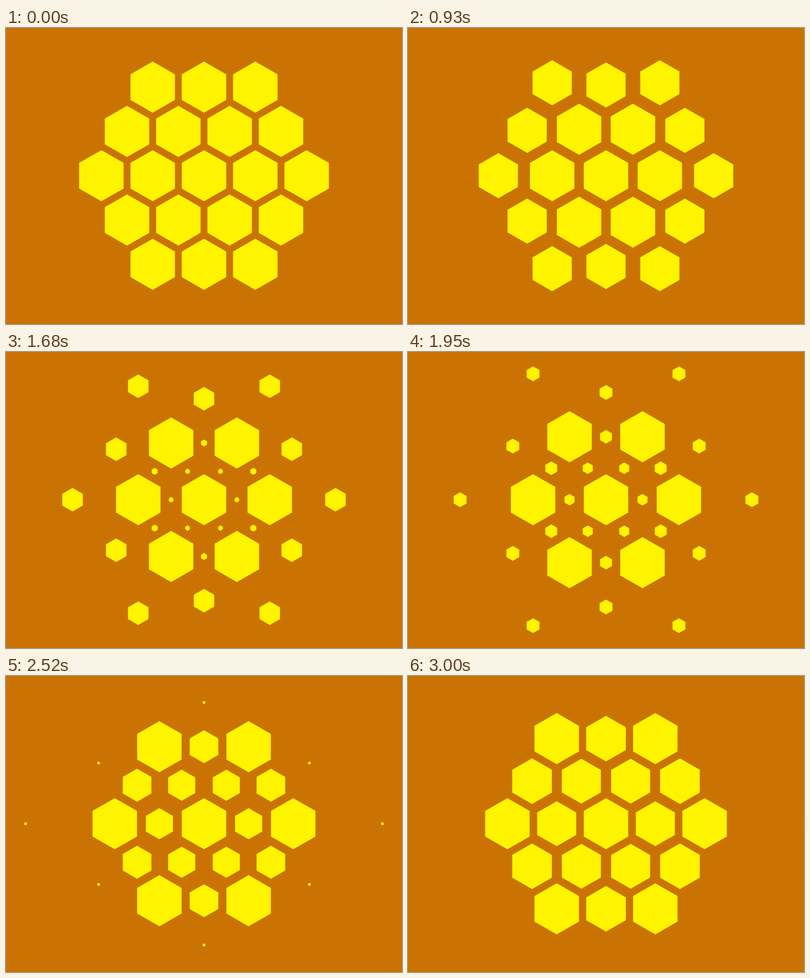
These frames come from a looping animation (700 px wide and 525 px high, 3.03 s). An HTML page with a canvas:

```html
<!DOCTYPE html>
<html lang="en">
<head>
<meta charset="utf-8">
<title>Honeycomb</title>
<style>
  html, body { margin: 0; width: 100%; height: 100%; overflow: hidden; background: #ca7302; }
  canvas { display: block; }
</style>
</head>
<body>
<canvas id="stage" width="700" height="525"></canvas>
<script>
const ctx = document.getElementById('stage').getContext('2d');
const LOOP = 3030;
const EASE_START = 175, EASE_TIME = 3525; // the loop cuts the ease short
const SHUTTER = 18, SAMPLES = 4;          // motion blur, ms and layers
const CENTER = { x: 350, y: 262 };
const RADIUS = 45.35;
const SPACING = 2 * RADIUS;

// Three rings of a hexagonal lattice.
const cells = [];
for (let i = -2; i <= 2; i++) {
  for (let j = -2; j <= 2; j++) {
    const ring = Math.max(Math.abs(i), Math.abs(j), Math.abs(i + j));
    if (ring > 2) continue;
    cells.push({
      x: SPACING * (i + j / 2),
      y: SPACING * j * Math.sqrt(3) / 2,
      ring,
      corner: i * j * (i + j) === 0
    });
  }
}

function ease(t) {
  const u = Math.min(1, Math.max(0, (t - EASE_START) / EASE_TIME));
  return u * u / (u * u + (1 - u) * (1 - u));
}

function hexagon(cell, zoom, size) {
  const x = CENTER.x + cell.x * zoom, y = CENTER.y + cell.y * zoom;
  ctx.beginPath();
  for (let k = 0; k < 6; k++) {
    const a = Math.PI * (k / 3 + 1 / 6);
    ctx.lineTo(x + RADIUS * size * Math.cos(a), y + RADIUS * size * Math.sin(a));
  }
  ctx.fill();
}

function drawCells(t) {
  const p = ease(t);
  const zoom = 2 ** p;
  const fade = (1 - p) ** 1.75;
  for (const cell of cells) {
    const edge = cell.ring === 2 && !cell.corner;
    hexagon(cell, edge ? (1 + zoom) / 2 : zoom, cell.ring === 2 ? fade : 1);

    // New cells grow halfway between the spreading ones.
    if (cell.ring === 1) hexagon(cell, zoom / 2, p ** 2.2);
    if (edge) hexagon(cell, zoom / 2, p ** 1.95);
  }
}

// Adding faint layers averages the moments while the shutter is open.
function draw(t) {
  ctx.clearRect(0, 0, 700, 525);
  ctx.globalCompositeOperation = 'lighter';
  ctx.globalAlpha = 1 / SAMPLES;
  ctx.fillStyle = '#fff200';
  for (let k = 0; k < SAMPLES; k++) {
    drawCells(t + SHUTTER * ((k + 0.5) / SAMPLES - 0.5));
  }
}

const start = performance.now();
function tick() {
  draw((performance.now() - start) % LOOP);
  requestAnimationFrame(tick);
}
tick();
</script>
</body>
</html>
```
